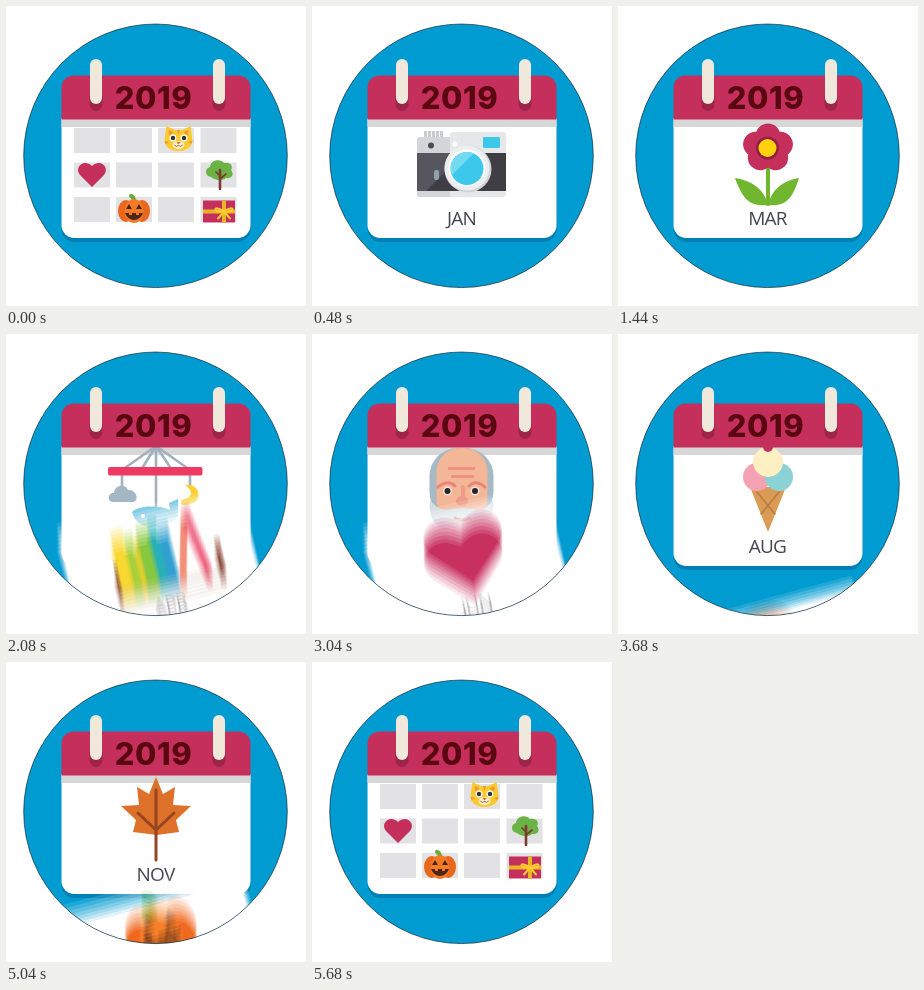
Write an HTML page with a canvas that moves like this. It is 300 px wide and 300 px high and loops after 6400 ms.

```html
<!DOCTYPE html>
<html lang="en">
<head>
<meta charset="utf-8">
<title>Calendar 2019</title>
<style>
  html, body { margin: 0; width: 100%; height: 100%; overflow: hidden; background: #fff; }
  canvas { display: block; width: 300px; height: 300px; }
</style>
</head>
<body>
<canvas id="stage"></canvas>
<script>
const SIZE = 300, STEP = 80, LOOP = 6400, STEPS_PER_PAGE = 6, REST_STEP = 71;
const RATIO = window.devicePixelRatio || 1;
const RED = '#c4305b', GREEN = '#70b62f', LEAF = '#6bb345', BROWN = '#7b3b31',
      YELLOW = '#fcc931', CYAN = '#3cc8ea', INK = '#3f3e45', SILVER = '#dfe1e4';

// Pose of a falling page after each step
const DROP = [0, 22, 67, 120, 163, 190, 190];
const TILT = [0, 8, 14, 15, 15, 15, 15];
const SHIFT = [0, 1, 4, 5, 5, 5, 5];

function setup(canvas) {
  canvas.width = canvas.height = SIZE * RATIO;
  const g = canvas.getContext('2d');
  g.scale(RATIO, RATIO);
  return g;
}
const stage = setup(document.getElementById('stage'));
const sheet = setup(document.createElement('canvas'));
const layer = setup(document.createElement('canvas'));
let c = stage;

function fill(color, path) {
  c.fillStyle = color;
  c.beginPath();
  path();
  c.fill();
}
const box = (color, x, y, w, h, r = 0) => fill(color, () => c.roundRect(x, y, w, h, r));
const disc = (color, x, y, rx, ry = rx) => fill(color, () => c.ellipse(x, y, rx, ry, 0, 0, 7));
const shape = (color, d) => { c.fillStyle = color; c.fill(new Path2D(d)); };
function line(color, width, d) {
  c.strokeStyle = color;
  c.lineWidth = width;
  c.lineCap = 'round';
  c.stroke(new Path2D(d));
}
function at(x, y, scale, draw) {
  c.save();
  c.translate(x, y);
  c.scale(scale, scale);
  draw();
  c.restore();
}
function write(words, x, y, font, color, stretch, spacing) {
  c.save();
  c.fillStyle = color;
  c.textAlign = 'center';
  c.font = font;
  c.fontStretch = stretch;
  c.letterSpacing = spacing;
  c.fillText(words, x, y);
  c.restore();
}

// Icons, drawn around 0,0 at the size used in the grid
function cat() {
  shape(YELLOW, 'M-12-13L-4-9H4L12-13L14 1C14 8 8 12 0 12S-14 8-14 1Z');
  shape('#ee9b2c', 'M-10-9L-5-7L-9-3ZM10-9L5-7L9-3ZM-1.5-9H1.5L0-4ZM-14 2L-9 3L-13 5ZM14 2L9 3L13 5Z');
  for (const x of [-5.5, 5.5]) {
    disc('#fff', x, -1, 3.4);
    disc('#333', x, -1, 2.2);
  }
  disc('#fff0c4', 0, 6, 6, 4);
  shape('#d95c4c', 'M-2 3H2L0 5.5Z');
  line('#7a4a22', 0.8, 'M-4 6Q-2 9 0 6Q2 9 4 6');
}
function heart() {
  shape(RED, 'M0 13L-12 1C-18-6-9-16 0-8C9-16 18-6 12 1Z');
}
function tree() {
  shape(LEAF, 'M-9 4C-16 3-15-5-10-6C-9-14 1-14 4-10C12-12 13-5 11-3C15 2 11 6 6 5C3 8-4 8-9 4Z');
  line(BROWN, 2.6, 'M0-3V16');
  line(BROWN, 1.7, 'M0 6L6 1M0 3L-4-1');
}
function pumpkin() {
  line('#65ad37', 4, 'M0-8Q0-12-3-13');
  disc('#e9681d', -8, 2, 8, 11);
  disc('#e9681d', 8, 2, 8, 11);
  disc('#f47a25', 0, 2, 9.5, 12);
  shape('#4b2518', 'M-8 0L-5-5L-2 0ZM2 0L5-5L8 0ZM-9 4H-5V6H-2V4H2V6H5V4H9Q6 11 0 11T-9 4Z');
}
function gift() {
  box(RED, -16, -11, 32, 22);
  box('#e9b526', -16, -2, 32, 4);
  box('#e9b526', 3, -11, 4, 22);
  line(YELLOW, 2, 'M5 0C-6-8-7 2 5 0C16-8 17 2 5 0L-1 7M5 0L11 7');
  disc(YELLOW, 5, 0, 2.2);
}

function grid() {
  for (const y of [122, 156.5, 191])
    for (const x of [68, 110, 152, 194.5]) box('#e2e2e4', x, y, 36, 25);
  at(172.5, 133, 1, cat);
  at(86, 168, 1, heart);
  at(214, 167, 1, tree);
  at(128, 203, 1, pumpkin);
  at(213, 205.5, 1, gift);
}

function camera() {
  for (let x = 112; x < 130; x += 4) box('#c9cbce', x, 125, 3, 7);
  box('#d3d5d8', 105, 131, 50, 60, 3);
  box('#e6e7e9', 138, 126, 56, 65, 3);
  box(INK, 105, 147, 89, 38);
  shape('#57565e', 'M105 147H152L114 185H105Z');
  box('#8fa3ad', 122, 164, 5, 10, 2);
  disc('#4d4c54', 119, 139.5, 3);
  disc('#fff', 143, 138, 2.6);
  box(CYAN, 171, 131, 17, 11, 1);
  disc('#cfd2d6', 156, 163, 23.5);
  disc('#eceef0', 155, 162, 22.5);
  disc('#fff', 155, 162, 18.5);
  disc(CYAN, 155, 162.5, 16.5);
  c.save();
  c.beginPath();
  c.arc(155, 162.5, 16.5, 0, 7);
  c.clip();
  shape('#74daf1', 'M135 174L165 144H135Z');
  c.restore();
}

function flower() {
  line(GREEN, 4, 'M150 160V198');
  shape(GREEN, 'M150 199C130 201 124 191 117 172C135 175 146 183 150 199C154 183 164 175 181 172C175 191 169 201 150 199Z');
  for (let i = 0; i < 5; i++) {
    const a = (i * 72 - 90) * Math.PI / 180;
    disc(RED, 150 + 13 * Math.cos(a), 142 + 12 * Math.sin(a), 12.5);
  }
  disc('#951f43', 149.5, 142, 11.5);
  disc('#fdd10b', 149.5, 142, 9);
}

function books() {
  box('#d8c4c0', 102, 187, 108, 6);
  box('#8c4a3a', 102, 160, 4, 30);
  box('#8c4a3a', 206, 157, 6, 33);
  box('#f6d42c', 106, 128, 13, 59);
  box('#a5cf33', 119, 133, 9, 54);
  box('#f2d028', 128, 138, 4, 49);
  box('#86c440', 132, 128, 13, 59);
  box('#28aeb6', 145, 125, 9, 62);
  box('#2f9fd0', 154, 130, 11, 57);
  line('#f08a76', 7, 'M184 123L168 184');
  line('#e63a60', 7, 'M186 123L195 184');
}

function mobile() {
  line('#a3b1bd', 2.6, 'M150 111V172M150 112L116 136M150 112L184 136M150 112L135 136M150 112L166 136M116 140V154M184 140V153');
  box('#ee3a62', 102, 133, 94.5, 8.5, 2);
  shape('#a4b7c5', 'M108 168C100 168 102 158 108 159C109 150 120 150 122 156C131 155 134 168 126 168Z');
  shape('#fccf2c', 'M179 151C196 149 198 171 179 171C173 171 174 166 179 165C187 163 187 156 179 151Z');
  shape('#56bbdd', 'M126 178C135 170 155 172 164 176L163 169L172 165L172 182C164 199 131 199 126 178Z');
  disc('#fff', 137, 182, 2);
}

function grandpa() {
  box('#a6b9c4', 117.5, 114, 64, 72, 28);
  box('#f3b697', 124.5, 114, 51, 75, 24);
  box('#ec937f', 136, 133, 27, 3);
  box('#ec937f', 139, 141, 23, 3);
  line('#e9857a', 3, 'M126 153Q136 145 143 152M157 152Q164 145 173 153');
  for (const x of [135.5, 163]) {
    disc('#fbe3d6', x, 157, 4.5);
    disc('#28252a', x, 157, 3);
  }
  line('#ee9c88', 4, 'M151 153V165');
  disc('#ee9c88', 150, 167, 6, 5);
  shape('#d3dde2', 'M118 166C130 181 137 174 150 174S170 181 181 166C184 188 171 200 150 200S115 188 118 166Z');
  line('#c27568', 3, 'M143 184Q150 188 157 184');
}

function iceCream() {
  shape('#d99b55', 'M132 153H168L150 198Z');
  line('#b9783c', 1.5, 'M139 158L157 180M161 158L143 180');
  disc('#f3a1b3', 139, 143, 14);
  disc('#8ad2d5', 161, 143, 14);
  disc('#fff0c4', 150, 128, 15);
  disc(RED, 150, 113, 5);
}

function mapleLeaf() {
  shape('#dd7129', 'M150 115L157 132L169 125L167 143L185 144L170 158L173 170L151 173L127 170L130 158L115 144L133 143L131 125L143 132Z');
  line('#974423', 3, 'M150 128V198M150 168L132 151M150 168L168 151');
}

const month = (name, art) => () => {
  art();
  write(name, 149.5, 219, '19px "Open Sans", "Noto Sans", sans-serif', '#45474c', 'condensed', '-0.8px');
};
const icon = (draw, x, y, scale) => () => at(x, y, scale, draw);

const pages = [
  grid,
  month('JAN', camera),
  month('FEB', icon(cat, 150, 158, 2.6)),
  month('MAR', flower),
  month('APR', books),
  month('MAY', mobile),
  month('JUN', icon(heart, 151, 155, 2.85)),
  month('JUL', grandpa),
  month('AUG', iceCream),
  month('SEP', icon(tree, 149, 151, 2.8)),
  month('OCT', icon(pumpkin, 151, 152, 2.25)),
  month('NOV', mapleLeaf),
  month('DEC', icon(gift, 150, 158, 2.6))
];

function mix(table, u) {
  const i = Math.floor(u);
  return table[i] + (table[Math.min(i + 1, table.length - 1)] - table[i]) * (u - i);
}

const paper = () => box('#fff', 55.5, 112, 189, 120, [0, 0, 13, 13]);

// Average of several poses gives the motion blur
function drawFalling(drawPage, step) {
  const copies = 8;
  c = sheet;
  c.clearRect(0, 0, SIZE, SIZE);
  paper();
  drawPage();
  c = stage;
  layer.clearRect(0, 0, SIZE, SIZE);
  layer.globalCompositeOperation = 'lighter';
  layer.globalAlpha = 1 / copies;
  for (let i = 0; i < copies; i++) {
    const u = step + (i / (copies - 1) - 0.5) * 0.5;
    layer.save();
    layer.translate(150 + mix(SHIFT, u), 160 + mix(DROP, u));
    layer.rotate(-mix(TILT, u) * Math.PI / 180);
    layer.drawImage(sheet.canvas, -150, -160, SIZE, SIZE);
    layer.restore();
  }
  stage.drawImage(layer.canvas, 0, 0, SIZE, SIZE);
}

function drawHeader() {
  box(RED, 55.5, 69.5, 189, 44, [12, 12, 0, 0]);
  for (const x of [90, 213]) {
    box('#9f2449', x - 6.5, 84, 13, 21, 6.5);
    box('#f0e8da', x - 6, 53, 12, 45, 6);
  }
  write('2019', 147.5, 103, '800 31px Inter, "Open Sans", sans-serif', '#5b0712', 'normal', '0.5px');
}

function trace() {
  c.beginPath();
  c.arc(149.5, 149.8, 131.8, 0, 7);
}

function render(time) {
  const n = Math.floor(time % LOOP / STEP);
  const resting = n >= REST_STEP;
  const index = resting ? 0 : Math.floor(n / STEPS_PER_PAGE);
  const step = resting ? 0 : n % STEPS_PER_PAGE;
  c.fillStyle = '#fff';
  c.fillRect(0, 0, SIZE, SIZE);
  c.save();
  trace();
  c.clip();
  c.fillStyle = '#009bd1';
  c.fillRect(0, 0, SIZE, SIZE);
  box('#007fb5', 55.5, 112, 189, 124, [0, 0, 13, 13]);
  paper();
  box('#d7d7d7', 55.5, 113, 189, 8);
  pages[step ? index + 1 : index]();
  if (step) drawFalling(pages[index], step);
  drawHeader();
  c.restore();
  c.strokeStyle = 'rgba(5, 20, 30, 0.75)';
  c.lineWidth = 0.8;
  trace();
  c.stroke();
}

let start;
function tick(now) {
  start ??= now;
  render(now - start);
  requestAnimationFrame(tick);
}
render(0);
requestAnimationFrame(tick);
</script>
</body>
</html>
```
